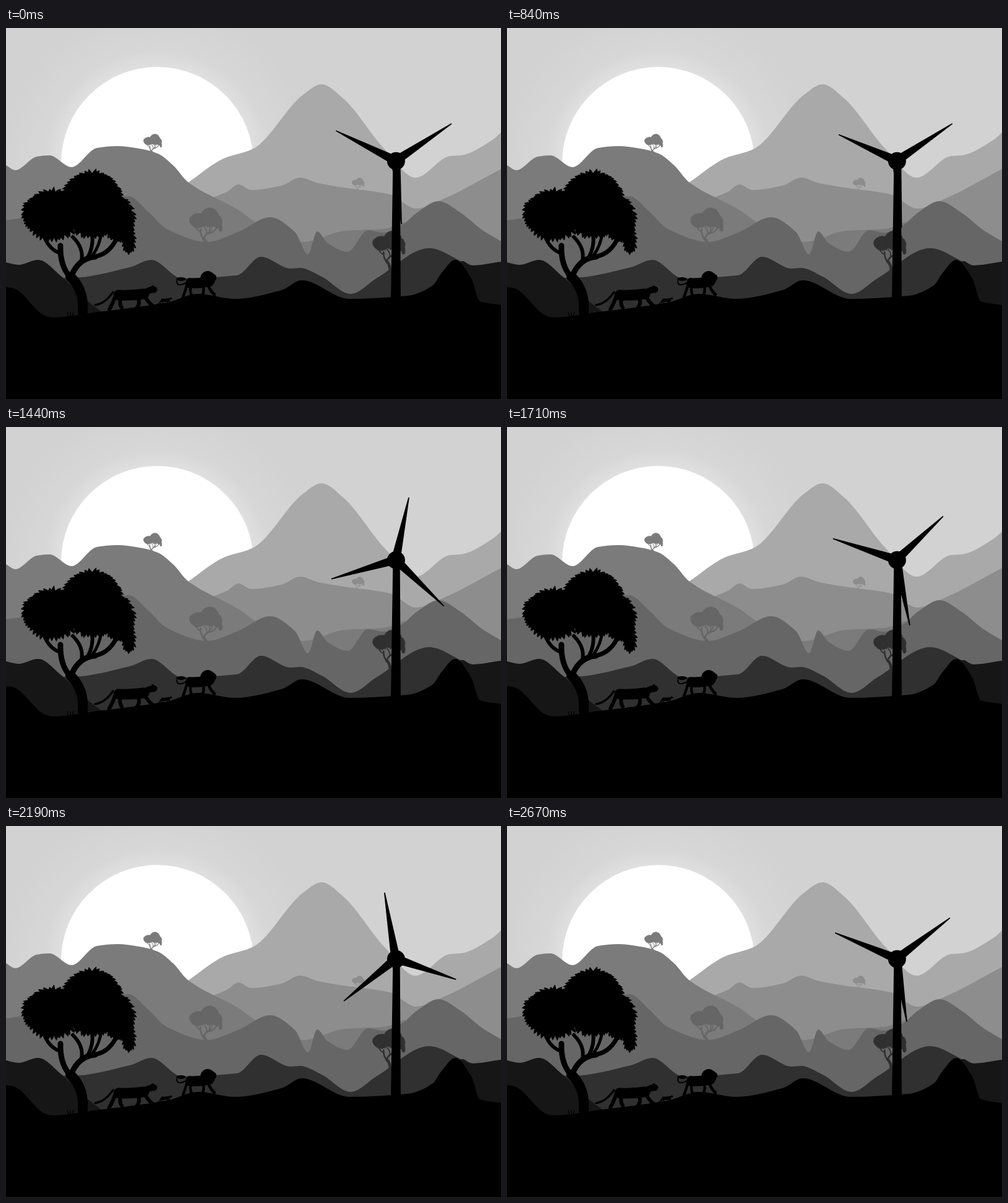
An HTML page with a canvas for the animation above (2.7 s loop, 800 px wide and 600 px high).

```html
<!DOCTYPE html>
<html lang="en">
<head>
<meta charset="utf-8">
<title>Wind turbine at sunrise</title>
<style>
html, body { margin: 0; width: 100%; height: 100%; overflow: hidden; background: #000; }
canvas { display: block; width: 800px; height: 600px; }
</style>
</head>
<body>
<canvas id="stage" width="800" height="600"></canvas>
<script>
const ctx = document.getElementById('stage').getContext('2d');
const backdrop = document.createElement('canvas');
backdrop.width = 800;
backdrop.height = 600;
const bg = backdrop.getContext('2d');
const TAU = Math.PI * 2;

function random(seed) {
  return () => (seed = (seed * 16807) % 2147483647) / 2147483647;
}

function ellipse(x, y, rx, ry = rx) {
  bg.beginPath();
  bg.ellipse(x, y, rx, ry, 0, 0, TAU);
  bg.fill();
}

function limb(width, x0, y0, cx, cy, x1, y1) {
  bg.lineWidth = width;
  bg.beginPath();
  bg.moveTo(x0, y0);
  bg.quadraticCurveTo(cx, cy, x1, y1);
  bg.stroke();
}

// Skyline eased through a few key points: level at peaks and valleys, never overshooting.
function ridge(color, text) {
  const pts = text.trim().split(/\s+/).map(pair => pair.split(',').map(Number));
  const last = pts.length - 1;
  const secant = i => (pts[i + 1][1] - pts[i][1]) / (pts[i + 1][0] - pts[i][0]);
  const slope = i => {
    if (i === 0) return secant(0);
    if (i === last) return secant(last - 1);
    const a = secant(i - 1), b = secant(i);
    return a * b <= 0 ? 0 : 2 * a * b / (a + b);
  };
  bg.fillStyle = color;
  bg.beginPath();
  bg.moveTo(pts[0][0], 600);
  bg.lineTo(...pts[0]);
  for (let i = 0; i < last; i++) {
    const [x0, y0] = pts[i], [x1, y1] = pts[i + 1], third = (x1 - x0) / 3;
    bg.bezierCurveTo(x0 + third, y0 + slope(i) * third,
      x1 - third, y1 - slope(i + 1) * third, x1, y1);
  }
  bg.lineTo(pts[last][0], 600);
  bg.fill();
}

// A clump of foliage fringed with drooping leaves.
function foliage(x, y, rx, ry, rnd) {
  ellipse(x, y, rx - 3, ry - 3);
  const count = Math.round((rx + ry) / 2);
  for (let i = 0; i < count; i++) {
    const angle = (i + rnd() * 0.5) / count * TAU;
    const dx = Math.cos(angle), dy = Math.sin(angle);
    bg.save();
    bg.translate(x + dx * (rx - 4), y + dy * (ry - 4));
    bg.rotate(Math.atan2(dy + 0.7, dx * 1.3));
    bg.beginPath();
    bg.moveTo(-5, -4);
    bg.quadraticCurveTo(3, -4, 5 + rnd() * 4, 0);
    bg.quadraticCurveTo(3, 3, -5, 4);
    bg.fill();
    bg.restore();
  }
}

function drawTree(color, left, top, scale) {
  const rnd = random(77);
  bg.save();
  bg.translate(left, top);
  bg.scale(scale, scale);
  bg.translate(-25, -229);
  bg.fillStyle = bg.strokeStyle = color;
  bg.lineCap = 'round';

  foliage(75, 302, 46, 41, rnd);
  foliage(43, 300, 17, 23, rnd);
  foliage(139, 285, 51, 54, rnd);
  foliage(181, 309, 27, 36, rnd);
  foliage(198, 342, 11, 22, rnd);

  limb(16, 124, 460, 127, 424, 104, 402);
  limb(9, 103, 402, 87, 384, 88, 352);
  limb(6, 87, 364, 70, 358, 62, 338);
  limb(9, 106, 400, 118, 372, 144, 370);
  limb(7, 140, 370, 164, 368, 177, 344);
  limb(6, 122, 376, 126, 356, 108, 338);
  limb(6, 132, 371, 142, 354, 139, 332);
  limb(5, 141, 366, 151, 352, 154, 332);
  bg.restore();
}

// A walking cat; the origin lies on the ground below its haunches.
function drawCat(x, y, sx, sy) {
  bg.save();
  bg.translate(x, y);
  bg.scale(sx, sy);
  limb(17, 2, -25, 24, -24, 43, -27);
  limb(10, 43, -28, 50, -33, 57, -34);
  ellipse(58, -34, 6.5, 5.5);
  ellipse(57, -39, 2);
  limb(6, 45, -22, 52, -10, 60, -6);
  limb(6, 34, -20, 37, -10, 31, -4);
  limb(6, 5, -20, 3, -10, 7, -5);
  limb(6, -4, -22, -8, -10, -13, -2);
  bg.restore();
}

function drawAnimals() {
  bg.fillStyle = bg.strokeStyle = '#000';
  bg.lineCap = 'round';

  limb(3.2, 173, 427, 160, 446, 144, 448);
  drawCat(180, 457, 1, 1);

  limb(1.3, 250, 441, 247, 447, 242, 448);
  drawCat(252, 448, 0.25, 0.31);

  limb(2, 291, 412, 276, 420, 276, 409);
  ellipse(283, 406, 8, 3);
  drawCat(295, 437, 0.7, 0.98);
  ellipse(326, 406, 12, 13);

  for (let i = 0; i < 3; i++) limb(1.4, 101 + i * 3, 469, 101 + i * 3, 464, 99 + i * 5, 460);
}

function drawSky() {
  const glow = bg.createRadialGradient(244.5, 218.5, 154, 244.5, 218.5, 250);
  glow.addColorStop(0, '#e0e0e0');
  glow.addColorStop(0.3, '#d7d7d7');
  glow.addColorStop(1, '#d2d2d2');
  bg.fillStyle = glow;
  bg.fillRect(0, 0, 800, 600);
  bg.fillStyle = '#fff';
  ellipse(244.5, 218.5, 155.5);
}

function drawTower() {
  bg.beginPath();
  bg.moveTo(625.3, 222);
  bg.lineTo(636.7, 222);
  bg.lineTo(638, 440);
  bg.lineTo(622, 440);
  bg.fill();
  ellipse(630.4, 215.3, 14.5);
}

function drawBackdrop() {
  drawSky();
  ridge('#a9a9a9', `294,250 352,211 400,195 480,108 510,91 545,114 612,196 662,242 718,207
    735,206 786,181 800,169`);
  drawTree('#8d8d8d', 559, 242, 0.11);
  ridge('#8d8d8d', `310,283 357,265 376,253 396,262 445,255 475,242 505,251 545,258 620,269
    663,292 710,275 800,228`);
  drawTree('#7b7b7b', 222, 171, 0.163);
  ridge('#7b7b7b', `0,222 15,230 50,208 70,206 106,225 147,194 180,191 215,195 245,203 270,222
    295,250 375,294 410,318 480,346 548,328 610,325 645,313`);
  drawTree('#666', 296, 290, 0.292);
  ridge('#666', `0,311 100,297 198,272 230,297 260,325 325,346 375,330 427,306 467,330 488,366
    503,329 520,348 552,362 585,327 610,331 640,319 665,298 699,280 735,299 770,327 800,345`);
  drawTree('#303030', 592, 327, 0.29);
  ridge('#303030', `60,404 105,404 200,387 235,375 285,405 373,400 412,370 460,389 475,388
    510,402 557,430 600,404 684,356 740,379 770,390`);
  ridge('#161616', '0,379 20,383 52,375 90,402 130,440 160,463');
  ridge('#161616', '715,390 738,377 752,384 800,378');
  ridge('#000', `0,419 12,421 65,466 75,468 150,459 260,444 310,430 370,438 445,424 478,408
    555,438 650,433 690,416 704,396 726,375 752,405 766,442 800,448`);
  drawTree('#000', 25, 229, 1);
  drawAnimals();
  drawTower();
}

const LOOP = 2700, STEP = 30;
const FIRST_TURN = { ms: 840, degrees: 119.5 };
const bladeTips = [[-96.6, -48.7], [90.4, -60.1], [9.3, 102.6]];

// The first third of the turn runs slightly faster than the rest.
function rotorAngle(ms) {
  const { ms: mid, degrees } = FIRST_TURN;
  const turned = ms < mid
    ? degrees * ms / mid
    : degrees + (360 - degrees) * (ms - mid) / (LOOP - mid);
  return turned / 360 * TAU;
}

function drawBlade([x, y]) {
  const length = Math.hypot(x, y);
  ctx.save();
  ctx.rotate(Math.atan2(y, x));
  ctx.beginPath();
  ctx.moveTo(0, -6);
  ctx.lineTo(14, -6.6);
  ctx.lineTo(length, -0.8);
  ctx.lineTo(length, 0.8);
  ctx.lineTo(14, 6.6);
  ctx.lineTo(0, 6);
  ctx.fill();
  ctx.restore();
}

function render() {
  const ms = Math.floor(performance.now() % LOOP / STEP) * STEP;
  ctx.drawImage(backdrop, 0, 0);
  ctx.save();
  ctx.translate(629.8, 214.8);
  ctx.rotate(rotorAngle(ms));
  ctx.fillStyle = '#000';
  bladeTips.forEach(drawBlade);
  ctx.restore();
  requestAnimationFrame(render);
}

drawBackdrop();
render();
</script>
</body>
</html>
```
